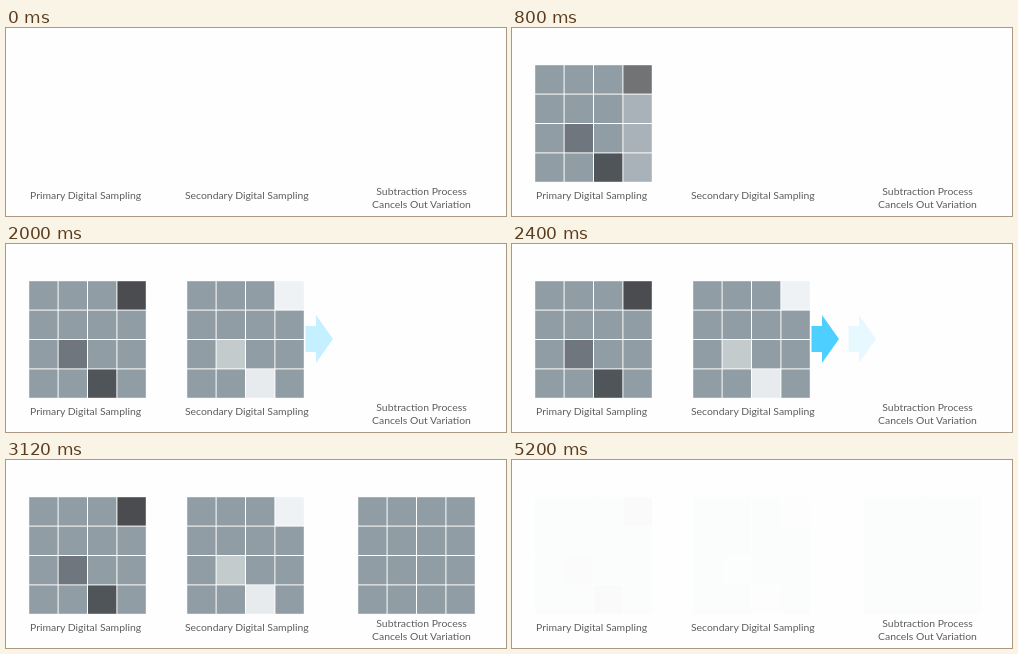
Recreate the animation shown at these times as an HTML page. Size 500 px wide and 188 px high, loop 5.32 s.

```html
<!DOCTYPE html>
<html lang="en">
<head>
<meta charset="utf-8">
<title>Digital sampling</title>
<style>
  html, body { margin: 0; width: 100%; height: 100%; overflow: hidden; background: #fefefe; }
  svg { display: block; width: 100%; height: 100%; }
  text { font: 10.4px Lato, "Open Sans", sans-serif; fill: #5c5d5f; text-anchor: middle; }
</style>
</head>
<body>
<svg id="stage" viewBox="0 0 500 188">
  <text x="79.6" y="171">Primary Digital Sampling</text>
  <text x="240.8" y="171">Secondary Digital Sampling</text>
  <text x="415.5" y="167">Subtraction Process</text>
  <text x="415.5" y="180">Cancels Out Variation</text>
</svg>
<script>
const LOOP = 5320, FADE = 400, BASE = "#919da4";
const PITCH = 29.4, CELL = 28.4;
const stage = document.getElementById("stage");
const parts = []; // elements with their fade-in and fade-out times

function add(tag, attrs, parent = stage) {
  const el = document.createElementNS("http://www.w3.org/2000/svg", tag);
  for (const key in attrs) el.setAttribute(key, attrs[key]);
  return parent.appendChild(el);
}

// A 4 x 4 grid whose columns appear one after another; odd cells are keyed "row,column".
function grid(left, start, stagger, odd = {}) {
  for (let col = 0; col < 4; col++) {
    const el = add("g", {});
    for (let row = 0; row < 4; row++) {
      add("rect", {
        x: left + col * PITCH, y: 37.2 + row * PITCH, width: CELL, height: CELL,
        fill: odd[row + "," + col] || BASE
      }, el);
    }
    const from = start + col * stagger;
    parts.push({ el, in: [from, from + FADE], out: [4740, 5208] });
  }
}

function arrow(x, start) {
  const el = add("path", {
    d: `M${x} 82h10.5v-11l17 24l-17 24v-11h-10.5z`, fill: "#4dd0ff"
  });
  parts.push({ el, in: [start, start + FADE], out: [2750, 2960] });
}

grid(23.2, 190, 100, { "0,3": "#4a4c4f", "2,1": "#6f767e", "3,2": "#50555a" });
grid(181.2, 990, 100, { "0,3": "#eef2f5", "2,1": "#c3cbcd", "3,2": "#e7ebee" });
grid(352.2, 2720, 0);
arrow(299.5, 1870);
arrow(336.5, 2350);

const ramp = (t, [a, b]) => Math.min(1, Math.max(0, (t - a) / (b - a)));

function draw() {
  const t = performance.now() % LOOP;
  for (const p of parts) {
    p.el.setAttribute("opacity", ramp(t, p.in) * (1 - ramp(t, p.out)));
  }
  requestAnimationFrame(draw);
}
draw();
</script>
</body>
</html>
```
